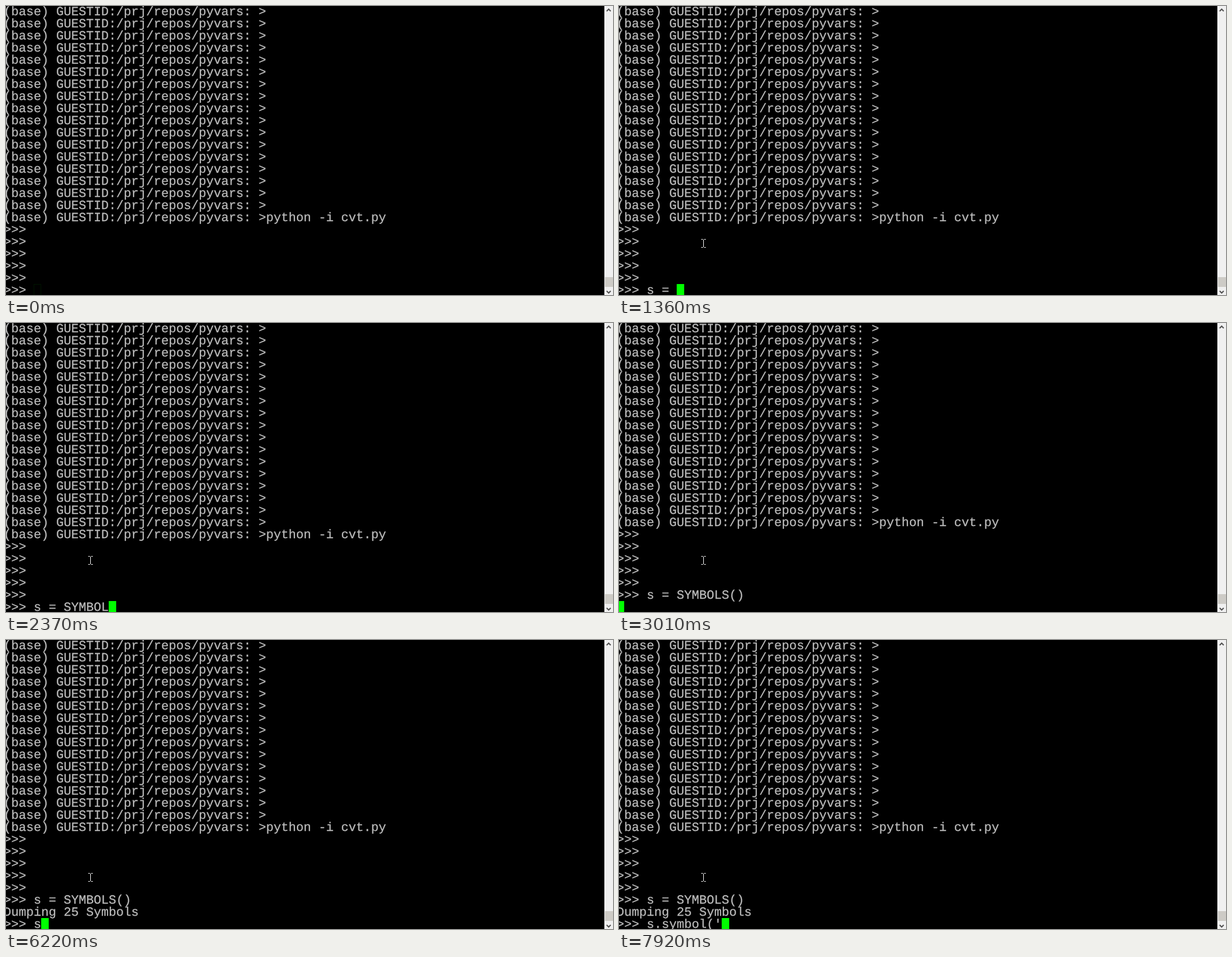
Animation, 1052 px wide and 501 px high, one loop 8 s. Source, as an HTML page:

```html
<!DOCTYPE html>
<html lang="en">
<head>
<meta charset="utf-8">
<title>Terminal</title>
<style>
html, body { margin: 0; width: 100%; height: 100%; overflow: hidden; background: #000; }
svg { display: block; }
text {
  font: 21.66px "Liberation Mono", "Noto Sans Mono", monospace;
  white-space: pre;
  text-rendering: geometricPrecision;
  fill: #bbb;
  stroke: #bbb;
  stroke-width: .3px;
}
.chevron { fill: none; stroke: #505050; stroke-width: 2; }
</style>
</head>
<body>
<svg width="1052" height="501" viewBox="0 0 1052 501">
  <rect width="1052" height="501"/>
  <rect id="caret" y="482" width="13" height="21"/>
  <g id="rows"></g>
  <path id="pointer" d="M-4-7h3m2 0h3M-4 7h3m2 0h3M0-6.5v13" fill="none" stroke="#fff"/>
  <rect x="1037" width="15" height="501" fill="#f0f0f0"/>
  <rect x="1038" y="470" width="14" height="17" fill="#cdcbc6"/>
  <path class="chevron" d="M1041 9l3.5-3.5 3.5 3.5M1041 494l3.5 3.5 3.5-3.5"/>
</svg>
<script>
const LOOP = 8000, ROWS = 24, CELL = 13, LINE = 21, LEFT = -4;
const PROMPT = '(base) GUESTID:/prj/repos/pyvars: >';
const FOCUS = 450, ENTER = 3010, OUTPUT = 3040, READY = 3070;

const first = 's = SYMBOLS()';
const firstKeys = [960, 1160, 1260, 1360, 1520, 1680, 1910, 2140, 2210, 2370, 2470, 2560, 2660];
const second = "s.symbol('";
const secondKeys = [6220, 6350, 6480, 6680, 6980, 7180, 7230, 7430, 7660, 7920];

const history = [
  ...Array(17).fill(PROMPT),
  PROMPT + 'python -i cvt.py',
  ...Array(5).fill('>>> ')
];

const $ = id => document.getElementById(id);
const caret = $('caret'), pointer = $('pointer');
const rows = Array.from({ length: ROWS }, (_, i) => {
  const row = document.createElementNS('http://www.w3.org/2000/svg', 'text');
  row.setAttribute('x', LEFT);
  row.setAttribute('y', 16 + i * LINE);
  return $('rows').appendChild(row);
});

const typed = (text, keys, t) => text.slice(0, keys.filter(k => k <= t).length);

function screen(t) {
  const lines = [...history, '>>> ' + typed(first, firstKeys, t)];
  if (t >= OUTPUT) lines.push('Dumping 25 Symbols');
  if (t >= ENTER) lines.push(t < READY ? '' : '>>> ' + typed(second, secondKeys, t));
  return lines.slice(-ROWS);
}

function drawCaret(column, focused) {
  const inset = focused ? 0 : .5;
  caret.setAttribute('x', LEFT + column * CELL + inset);
  caret.setAttribute('y', 482 + inset);
  caret.setAttribute('width', CELL - 2 * inset);
  caret.setAttribute('fill', focused ? '#0f0' : 'none');
  caret.setAttribute('stroke', focused ? 'none' : '#001600');
}

// The pointer glides in from the lower right in short hops.
function drawPointer(t) {
  const hop = Math.min(7, Math.floor((t - 70) / 54));
  const left = (1 - Math.max(0, hop) / 7) ** 2;
  const x = Math.round(146 + 704 * left), y = Math.round(411 + 83 * left);
  pointer.setAttribute('transform', `translate(${x + .5} ${y + .5})`);
  pointer.style.display = t < 70 ? 'none' : '';
}

function draw(now) {
  const t = now % LOOP;
  const lines = screen(t);
  rows.forEach((row, i) => {
    if (row.textContent !== lines[i]) row.textContent = lines[i];
  });
  drawCaret(lines[ROWS - 1].length, t >= FOCUS);
  drawPointer(t);
}

const start = performance.now();
function tick() {
  draw(performance.now() - start);
  requestAnimationFrame(tick);
}
tick();
</script>
</body>
</html>
```
